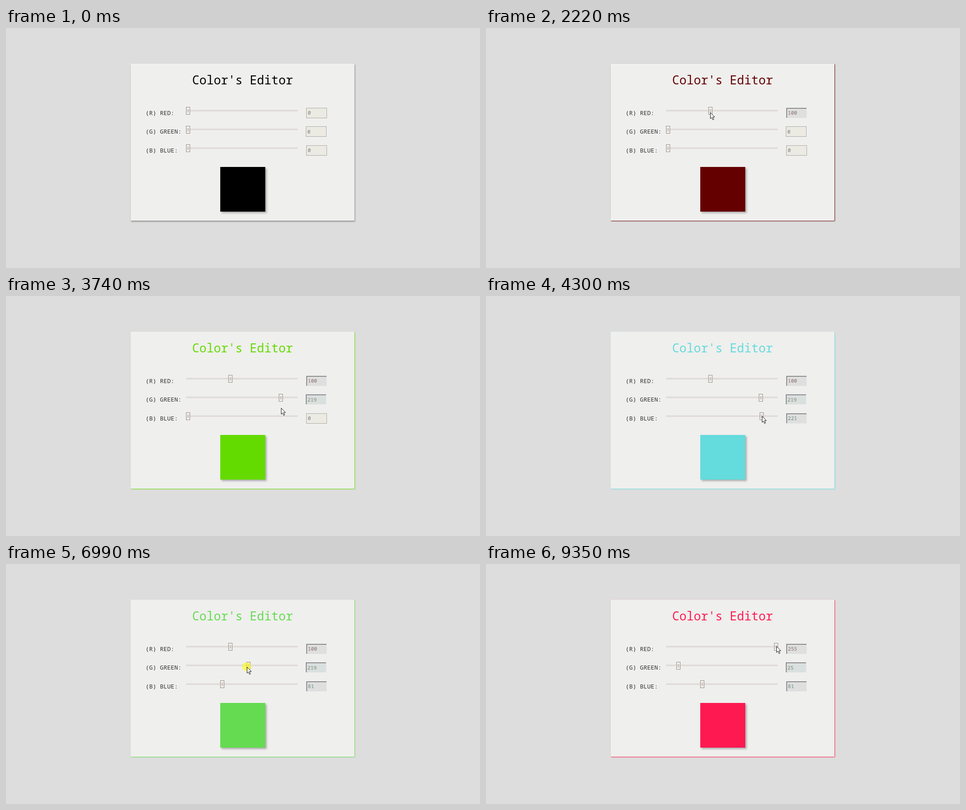
An HTML page that plays this animation: 1053 by 532 pixels, repeating every 9.66 s.

```html
<!DOCTYPE html>
<html lang="en">
<head>
<meta charset="utf-8">
<title>Color's Editor</title>
<style>
  html, body { margin: 0; width: 100%; height: 100%; overflow: hidden; background: #ddd; }
  div, svg { position: absolute; }
  svg { left: 0; top: 0; }
  #panel { left: 277px; top: 79px; width: 497px; height: 348px; background: #efefed; }
  #swatch { left: 476px; top: 307.5px; width: 99.5px; height: 99.5px; box-shadow: 3px 3px 4px #aaa; }
  text { font-family: "Roboto Mono", "Noto Sans Mono", "DejaVu Sans Mono", monospace; font-weight: 300; white-space: pre; }
  .title { font-size: 26.667px; }
  .label { font-size: 13.333px; fill: #333; }
  .value { font-size: 11.4px; }
</style>
</head>
<body>
<div id="panel"></div>
<div id="swatch"></div>
<svg id="stage" width="1053" height="532" viewBox="0 0 1053 532"></svg>
<script>
const LOOP = 9660, STEP = 80, MIN_X = 404, MAX_X = 644;
const panel = document.getElementById('panel');
const swatch = document.getElementById('swatch');
const stage = document.getElementById('stage');

const ease = {
  hold: () => 0,
  linear: p => p,
  out: p => 1 - (1 - p) ** 2,
  both: p => p * p * (3 - 2 * p)
};

// Pointer keys: time, x, y, easing towards the next key
const path = [
  [70, 923, 516, 'out'], [1030, 417, 192, 'out'], [1350, 408.5, 187, 'hold'],
  [1660, 408.5, 187, 'both'], [2140, 498, 187, 'hold'],
  [2220, 498, 187, 'both'], [2620, 578, 231, 'out'], [2940, 610, 225, 'hold'],
  [3260, 610, 225, 'both'], [4140, 612.5, 266, 'hold'],
  [4920, 612.5, 266, 'both'], [5400, 480.5, 273, 'hold'],
  [5640, 480.5, 273, 'both'], [6120, 580, 193, 'linear'], [6360, 612, 215, 'out'],
  [6600, 606, 228, 'hold'],
  [6830, 606, 228, 'linear'], [6990, 534.5, 228, 'out'], [7390, 424, 218, 'hold'],
  [7700, 424, 218, 'both'], [8100, 655, 184, 'hold'],
  [8330, 655, 184, 'out'], [8490, 651, 182, 'hold'],
  [8950, 651, 182, 'out'], [9110, 645, 182, 'hold']
];

// Presses: down, up, channel, value on release, grab offset
const presses = [
  [1660, 2220, 0, 100, 0],
  [3100, 3260, 1, 219, 0],
  [4220, 4300, 2, 221, 0],
  [4920, 5480, 2, 81, 0],
  [6830, 7470, 1, 25, 4],
  [8650, 8800, -1],
  [9190, 9350, 0, 255, 0]
];

function add(tag, attrs, text, parent = stage) {
  const el = document.createElementNS('http://www.w3.org/2000/svg', tag);
  set(el, attrs);
  if (text) el.textContent = text;
  return parent.appendChild(el);
}

function set(el, attrs) {
  for (const key in attrs) el.setAttribute(key, attrs[key]);
}

const title = add('text', { class: 'title', x: 413.5, y: 125 }, "Color's Editor");

const rows = [
  ['(R) RED:', 667, '#876f6d'],
  ['(G) GREEN:', 666, '#7d8a74'],
  ['(B) BLUE:', 667, '#708a80']
].map(([name, boxX, tint], i) => {
  const y = 183 + i * 41.5;
  const boxY = Math.round(y - 6.5);
  add('text', { class: 'label', x: 310, y: y + 9.5 }, name);
  add('rect', { x: 400, y: y - 1.5, width: 248, height: 3.4, rx: 1, fill: '#e0dbd8' });

  const thumb = add('g', {});
  add('rect', { x: -4, y: -8, width: 8, height: 16, fill: '#f4f1ee', stroke: '#918880' }, '', thumb);
  add('path', { d: 'M-2 -2.5h4M-2 0h4M-2 2.5h4', stroke: '#968e88', fill: 'none' }, '', thumb);

  const box = add('rect', { x: boxX + .5, y: boxY + .5, width: 45, height: 22 });
  const inset = add('path', { d: `M${boxX + 45} ${boxY + 1}H${boxX + 1}V${boxY + 22}`,
    fill: 'none', stroke: '#8b8b8d', 'stroke-width': 2 });
  const value = add('text', { class: 'value', x: boxX + 3.6, y: y + 9.3 });
  return { y: Math.round(y) + .5, thumb, box, inset, value, tint };
});

const halo = add('circle', { r: 10, fill: '#fffa18', 'fill-opacity': .62 });
const pointer = add('path', { d: 'M.5 .5V14L3.6 11.1L5.8 16.5L8.1 15.5L5.8 10.3H10Z',
  fill: '#fff', stroke: '#111', 'stroke-width': 1, 'stroke-linejoin': 'round' });

function pointerAt(t) {
  const n = path.findLastIndex(key => key[0] <= t);
  if (n < 0) return null;
  const [t0, x, y, kind] = path[n];
  const next = path[n + 1];
  if (!next) return { x, y };
  const passed = Math.floor((t - t0) / STEP) * STEP;
  const p = ease[kind](Math.min(1, passed / (next[0] - t0)));
  return { x: x + (next[1] - x) * p, y: y + (next[2] - y) * p };
}

function draw(t) {
  const at = pointerAt(t);
  const values = [0, 0, 0], used = [false, false, false], held = [];
  let down = false;
  for (const [start, end, ch, result, offset] of presses) {
    if (t < start) break;
    if (t < end) {
      down = true;
      if (ch >= 0) held[ch] = Math.max(MIN_X, Math.min(MAX_X, at.x + offset));
    } else if (ch >= 0) {
      values[ch] = result;
      used[ch] = true;
    }
  }

  rows.forEach((row, i) => {
    const x = held[i] ?? MIN_X + values[i] * (MAX_X - MIN_X) / 255;
    set(row.thumb, { transform: `translate(${Math.floor(x) + .5} ${row.y})` });
    set(row.box, used[i]
      ? { fill: i === 1 ? '#dadfdf' : '#dfdfdf', stroke: '#e9e9e8' }
      : { fill: '#ebebe4', stroke: '#aaa9a4' });
    set(row.inset, { visibility: used[i] ? 'visible' : 'hidden' });
    set(row.value, { fill: used[i] ? row.tint : '#7d7d78' });
    row.value.textContent = values[i];
  });

  const color = `rgb(${values})`;
  set(title, { fill: color });
  swatch.style.background = color;
  panel.style.boxShadow = used[0] ? `1px 1px 2px ${color}` : '1px 2px 3px #888';

  set(halo, { visibility: down ? 'visible' : 'hidden' });
  set(pointer, { visibility: at ? 'visible' : 'hidden' });
  if (at) {
    set(halo, { cx: at.x, cy: at.y });
    set(pointer, { transform: `translate(${Math.round(at.x)} ${Math.round(at.y)})` });
  }
}

const begin = performance.now();
function tick() {
  draw((performance.now() - begin) % LOOP);
  requestAnimationFrame(tick);
}
tick();
</script>
</body>
</html>
```
